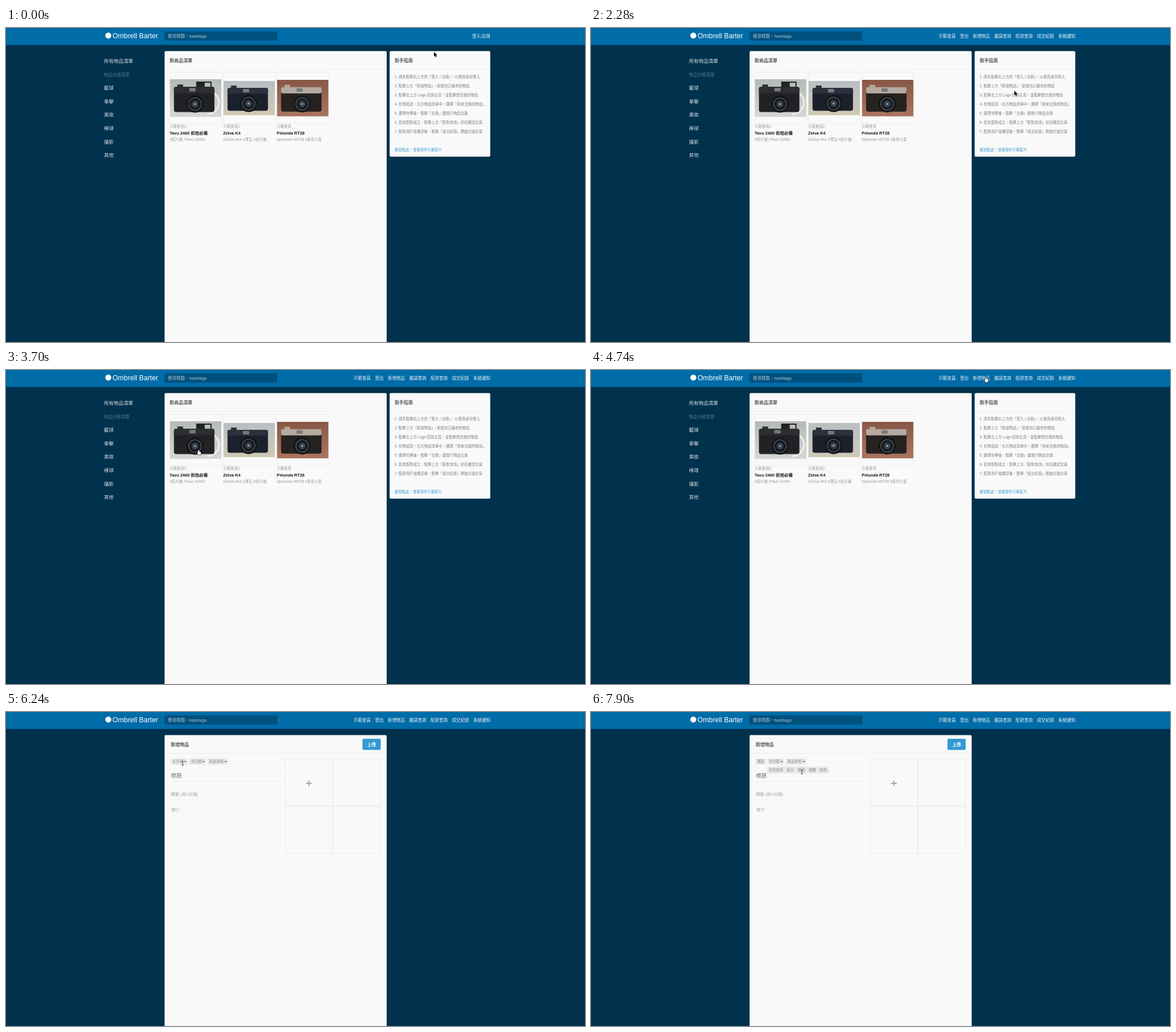
Recreate the animation shown at these times as an HTML page with a canvas. Size 1016 by 551 pixels, loop 7990 ms.

```html
<!DOCTYPE html>
<html lang="zh-Hant">
<head>
<meta charset="utf-8">
<title>Ombrell Barter</title>
<style>
  html, body { margin: 0; width: 100%; height: 100%; overflow: hidden; background: #00314d; }
  canvas { display: block; width: 1016px; height: 551px; }
</style>
</head>
<body>
<canvas id="stage"></canvas>
<script>
const W = 1016, H = 551, LOOP = 7990;
const FONT = '"Liberation Sans", "Noto Sans CJK TC", "Noto Sans CJK", sans-serif';
const BLUE = '#3498d4', PANEL = '#f9f9f9', LINE = '#ececec', CHIP = '#e9e9e9';
const EM = 6.4; // small text size

const canvas = document.getElementById('stage');
const ctx = canvas.getContext('2d');
const dpr = window.devicePixelRatio || 1;
canvas.width = W * dpr;
canvas.height = H * dpr;

// ---- drawing helpers ----
function rect(x, y, w, h, color, r = 0) {
  ctx.fillStyle = color;
  ctx.beginPath();
  ctx.roundRect(x, y, w, h, r);
  ctx.fill();
}

function frame(x, y, w, h) {
  ctx.strokeStyle = LINE;
  ctx.lineWidth = 1;
  ctx.strokeRect(x, y, w, h);
}

function disc(x, y, r, color) {
  ctx.fillStyle = color;
  ctx.beginPath();
  ctx.arc(x, y, r, 0, Math.PI * 2);
  ctx.fill();
}

// cy is the visual middle of the line
function text(s, x, cy, size, color, weight = 400, align = 'left') {
  ctx.font = `${weight} ${size}px ${FONT}`;
  ctx.textAlign = align;
  ctx.fillStyle = color;
  ctx.fillText(s, x, cy + size * 0.37);
}

// Chinese lines use the full-width comma
const wide = s => s.replaceAll(',', '\uff0c');

function panel(x, w, h, title, indent) {
  rect(x, 40.4, w, h, PANEL, 2);
  rect(x, 72, w, 1, LINE);
  text(title, x + indent, 57.2, 8, '#555', 700);
}

// ---- header ----
const LINKS = ['新增物品', '邀請查詢', '配對查詢', '成交紀錄', '系統通知'];
const LOGIN = '登入/註冊';

function navItems(t) {
  if (t < 1930) return [LOGIN];
  if (t >= 5010 && t < 5100) return [LOGIN, ...LINKS];
  return ['示範會員', '登出', ...LINKS];
}

function header(items) {
  rect(0, 0, W, 29.7, '#006ca8');
  disc(179.5, 13.3, 5.2, '#fff');
  text('Ombrell Barter', 187, 13.5, 12.3, '#fff');
  rect(278.3, 6, 197.7, 16, '#00507d', 2);
  text('搜尋標題、hashtags', 284, 14, 7.5, '#b0c8d7');
  let right = 850;
  for (const item of items.toReversed()) {
    text(item, right, 14, 7.5, '#f2f7fa', 400, 'right');
    right -= ctx.measureText(item).width + 7.5;
  }
}

// ---- home page ----
const CATEGORIES = ['籃球', '拳擊', '美妝', '棒球', '攝影', '其他'];
const GUIDE = [
  '請先點擊右上方的「登入 / 註冊」,以會員身份登入',
  '點擊上方「新增物品」,新增自己擁有的物品',
  '點擊左上方 Logo 回到主頁,並點擊想交換的物品',
  '在物品頁,右方物品清單中,選擇「用來交換的物品」',
  '選擇完畢後,點擊「交換」鍵進行物品交換',
  '若有配對成立,點擊上方「配對查詢」前往確認交易',
  '配對用戶皆確認後,點擊「成交紀錄」開始討論交易'
];
const CARDS = [
  { user: '示範會員3', title: 'Tavu 2460 街拍必備', tags: '#底片機 #Tavu #2460',
    h: 66, wall: '#b3bab7', table: '#d6d7d4', body: '#202225', plate: '#2c2e31', flash: true },
  { user: '示範會員2', title: 'Zelva K4', tags: '#Zelva #K4 #澤瓦 #底片機',
    h: 60, wall: '#b9bec3', table: '#cfc8b4', body: '#1b212c', plate: '#2a313d' },
  { user: '示範會員', title: 'Pelunda RT28', tags: '#pelunda #RT28 #南島六星',
    h: 64, wall: '#895747', table: '#a9755f', body: '#25221f', plate: '#b6aaa0' }
];

function camera({ h, wall, table, body, plate, flash }) {
  const g = ctx.createLinearGradient(0, 0, 0, h);
  g.addColorStop(0, wall);
  g.addColorStop(1, table);
  rect(0, 0, 90, h, g);
  const top = h * 0.2, lensY = h * 0.66;
  if (flash) {
    ctx.strokeStyle = '#eee';
    ctx.lineWidth = 3;
    ctx.beginPath();
    ctx.arc(66, h * 0.62, 20, -1.2, 1.6);
    ctx.stroke();
    rect(46, 4, 27, 18, body, 1);
    rect(61, 6, 10, 11, '#b9bbb8', 1);
  }
  rect(7, top, 71, h * 0.67, body, 4);
  rect(7, top, 71, h * 0.17, plate, 3);
  rect(13, top - 4, 10, 4, plate);
  rect(34, top + 2, 11, 6, '#777b7d', 1);
  for (const [size, color] of [[15, '#121417'], [12, '#43474b'], [10, '#17191d'], [6, '#33424f'], [2, '#8895a2']])
    disc(44, lensY, size, color);
}

function card(item, i) {
  const x = 287 + i * 94;
  frame(x + 0.5, 77.5, 90.5, 90);
  ctx.save();
  ctx.translate(x + 0.7, 123 - item.h / 2);
  camera(item);
  ctx.restore();
  text(item.user, x, 173, EM, '#999');
  text(item.title, x, 184.3, 7.4, '#191919', 700);
  text(item.tags, x, 196, 6.5, '#999');
}

function loginBox() {
  rect(755, 30, 95, 38, '#eee', 1);
  rect(755, 54.5, 95, 13.5, '#e4e4e4', 1);
  for (const y of [33.5, 43]) {
    rect(757.5, y, 69.5, 8.8, '#fff');
    rect(757.5, y + 8.3, 69.5, 0.7, '#aaa');
  }
  text('demo', 759.3, 38, 6.5, '#111');
  for (let i = 0; i < 3; i++) disc(760.6 + i * 2.4, 47.3, 0.85, '#111');
  rect(827.5, 33.5, 18.5, 18.5, BLUE, 2);
  text('送出', 836.8, 43, EM, '#fff', 700, 'center');
  text('前往註冊頁', 802, 61, EM, '#777', 400, 'center');
}

function home(t) {
  text('所有物品清單', 172, 58.3, 8.5, '#d8e1e6');
  text('物品分類清單', 172, 82, 7.45, '#55768a');
  CATEGORIES.forEach((s, i) => text(s, 172, 105.2 + i * 23.55, 8.5, '#d8e1e6'));

  panel(278.3, 389.7, H, '新商品清單', 8.7);
  if (t < 1930 || t >= 2020) CARDS.forEach(card);

  panel(673.2, 176.5, 185.4, '新手指南', 8.8);
  GUIDE.forEach((s, i) => text(`${i + 1}. ${wide(s)}`, 682, 86 + i * 16, EM, '#7c7c7c'));
  text(wide('歡迎點此,查看操作示範影片'), 682, 214, EM, BLUE);

  if (t >= 1060 && t < 1930) loginBox();
}

// ---- new item page ----
function chips(labels) {
  let x = 289;
  for (const label of labels) {
    const w = ctx.measureText(label).width;
    rect(x, 81.5, w, 11, CHIP, 1);
    x += w;
  }
}

function chipRow(labels) {
  let x = 289;
  for (const label of labels) {
    const menu = label !== '攝影';
    const w = label.length * EM + (menu ? 10.3 : 4.7);
    rect(x, 81.5, w, 11, CHIP, 1);
    text(label, x + 2.6, 87, EM, '#888');
    if (menu) caret(x + w - 4.2, 86);
    x += w + 2.9;
  }
}

function caret(x, y) {
  ctx.fillStyle = '#555';
  ctx.beginPath();
  ctx.moveTo(x - 2, y);
  ctx.lineTo(x + 2, y);
  ctx.lineTo(x, y + 2.4);
  ctx.fill();
}

function dropdown(x, items) {
  rect(x, 95.5, (items.join(' ').length + 1) * EM, 12.5, CHIP, 1);
  x += 3;
  for (const item of items) {
    text(item, x, 102, EM, '#888');
    x += (item.length + 1) * EM;
  }
}

function form(t) {
  panel(278.3, 389.7, H, '新增物品', 10.7);
  rect(625.5, 47, 32, 19.5, BLUE, 2);
  text('上傳', 641.4, 57, 7.5, '#fff', 700, 'center');

  chipRow([t < 7110 ? '主分類' : '攝影', '次分類', '商品狀態']);
  text('標題', 289.2, 111, 9.5, '#777', 500);
  text('標籤 (用#分隔)', 289.2, 144, 7.4, '#a3a3a3');
  text('簡介', 290.3, 171, 7.4, '#a3a3a3');
  for (const y of [121.5, 153.7, 247.2]) rect(289, y, 191, 0.9, LINE);

  for (const x of [490, 574.5])
    for (const y of [82, 166]) frame(x, y, 82.7, 82.5);
  rect(526.5, 124.2, 10, 2, '#a2a2a2');
  rect(530.5, 120.2, 2, 10, '#a2a2a2');

  if (t >= 6420 && t < 7110) dropdown(289, CATEGORIES);
  if (t >= 7730) dropdown(308.5, ['沖洗用具', '底片', '鏡頭', '相機', '其他']);
}

// ---- pointer: curved moves, sampled in steps ----
const STEP = 88;
const MOVES = [
  { from: 90, until: 790, bend: [735, 50], to: [834, 17] },
  { from: 1060, until: 1840, bend: [842, 64], to: [729, 160] },
  { from: 1930, until: 2640, bend: [752, 87], to: [737, 115] },
  { from: 2730, until: 3430, bend: [540, 192], to: [334, 140] },
  { from: 3700, until: 3870, to: [346, 141] },
  { from: 4140, until: 4740, bend: [760, -30], to: [693, 13] },
  { from: 5010, until: 5800, bend: [685, 52], to: [337, 114] },
  { from: 5890, until: 6240, to: [310, 90] },
  { from: 6420, until: 6930, bend: [345, 130], to: [374, 103] },
  { from: 7110, until: 7550, to: [324, 88] },
  { from: 7730, until: 7900, to: [370, 105] }
];

const mix = (a, b, u) => a.map((v, i) => v + (b[i] - v) * u);

function pointerAt(t) {
  let pos = [751, 42];
  for (const { from, until, to, bend = mix(pos, to, 0.5) } of MOVES) {
    if (t < from) break;
    const gaps = Math.round((until - from) / STEP);
    const done = Math.min(gaps, Math.floor((t - from + 4) / (until - from) * gaps));
    const u = (done + 1) / (gaps + 1);
    pos = mix(mix(pos, bend, u), mix(bend, to, u), u);
  }
  return pos;
}

function arrow() {
  const shape = new Path2D('M0 0V8L1.8 6.4 3.2 9.4 4.6 8.8 3.3 5.9 5.7 5.8Z');
  ctx.lineWidth = 0.9;
  ctx.strokeStyle = '#fff';
  ctx.stroke(shape);
  ctx.fillStyle = '#000';
  ctx.fill(shape);
}

function hand() {
  for (const [grow, color] of [[0.5, '#000'], [0, '#fff']]) {
    rect(-1 - grow, -grow, 2 + 2 * grow, 6 + 2 * grow, color, 1);
    rect(-2 - grow, 3 - grow, 6 + 2 * grow, 5.5 + 2 * grow, color, 1.8);
  }
}

function beam() {
  for (const [grow, color] of [[0.4, '#fff'], [0, '#222']]) {
    rect(-0.5 - grow, -4, 1 + 2 * grow, 8, color);
    for (const y of [-4, 3.2]) rect(-1.8 - grow, y - grow, 3.6 + 2 * grow, 0.8 + 2 * grow, color);
  }
}

function pointer(t) {
  const [x, y] = pointerAt(t);
  const inside = (x0, y0, x1, y1) => x >= x0 && x <= x1 && y >= y0 && y <= y1;
  const overLink = inside(610, 9, 850, 19) || (t < 5010 && inside(287, 78, 566, 200));
  const overField = t >= 5010 && inside(289, 80, 480, 250);
  ctx.save();
  ctx.translate(x, y);
  (overLink ? hand : overField ? beam : arrow)();
  ctx.restore();
}

function draw(t) {
  ctx.setTransform(dpr, 0, 0, dpr, 0, 0);
  rect(0, 0, W, H, '#00314d');
  header(navItems(t));
  (t < 5010 ? home : form)(t);
  pointer(t);
}

const start = performance.now();
function tick() {
  draw((performance.now() - start) % LOOP);
  requestAnimationFrame(tick);
}
tick();
</script>
</body>
</html>
```
